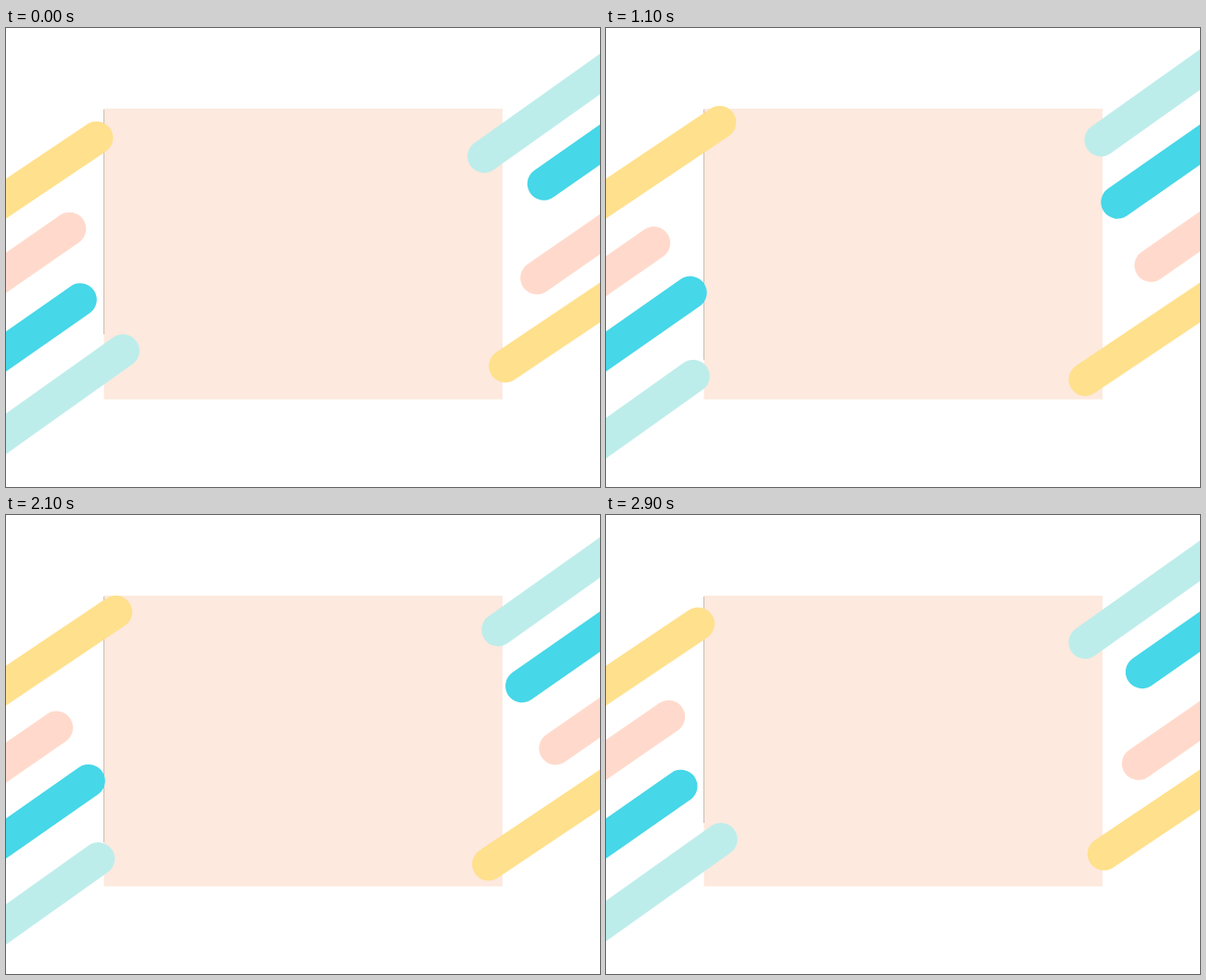
Write an HTML page with a canvas that moves like this. It is 640 by 495 pixels and loops after 3000 ms.

```html
<!DOCTYPE html>
<html lang="en">
<head>
<meta charset="utf-8">
<title>Sliding bars</title>
<style>
  html, body { margin: 0; width: 100%; height: 100%; overflow: hidden; background: #fff; }
  canvas { display: block; width: 640px; height: 495px; }
</style>
</head>
<body>
<canvas id="stage" width="640" height="495"></canvas>
<script>
const ctx = document.getElementById('stage').getContext('2d');
const WIDTH = 640, HEIGHT = 495;
const LOOP = 3000, STEP = 100, PEAK = 1520, RETURN = 2970;
const RADIUS = 17.8;
const PANEL = { left: 105.5, top: 87, right: 535, bottom: 400.5 };

// slope: tilt of the axis; drift: sideways shift while sliding.
const yellow = { color: '#ffe08c', slope: 0.672, drift: 0 };
const pink = { color: '#ffdacc', slope: 0.693, drift: 5 };
const cyan = { color: '#46d7e8', slope: 0.698, drift: 0 };
const mist = { color: '#bdedeb', slope: 0.711, drift: 6.5 };

// dir points from the stage side inwards; reach is the horizontal travel that way.
const bar = (style, dir, x, y, reach, peak = PEAK) => ({ ...style, dir, x, y, reach, peak });

const lowerMist = bar(mist, 1, 126, 348, -44.3);
const bars = [
  bar(yellow, 1, 97.5, 118.5, 34.5),
  bar(pink, 1, 68.5, 216.5, -23.5),
  bar(cyan, 1, 80, 293, 15),
  lowerMist,
  bar(mist, -1, 515, 138.5, -25.3),
  bar(cyan, -1, 579.5, 168, 39.3),
  bar(pink, -1, 572, 269.5, -25.6, 1860),
  bar(yellow, -1, 538, 364.5, 30)
];

// Linear out and back.
function travel(t, peak) {
  return t < peak ? t / peak : Math.max(0, (RETURN - t) / (RETURN - peak));
}

function tipAt(b, t) {
  const k = travel(t, b.peak) * b.dir;
  const dx = b.reach * k;
  return { x: b.x + dx, y: b.y - b.slope * dx + b.drift * k };
}

function drawBar(b, t) {
  const { x, y } = tipAt(b, t);
  const length = -b.dir * WIDTH;
  ctx.strokeStyle = b.color;
  ctx.beginPath();
  ctx.moveTo(x, y);
  ctx.lineTo(x + length, y - b.slope * length);
  ctx.stroke();
}

function drawPanel(t) {
  const { left, top, right, bottom } = PANEL;
  ctx.fillStyle = '#fde9de';
  ctx.fillRect(left, top, right - left, bottom - top);
  // The hairline ends at the lower bar while that bar overlaps the panel.
  const { x, y } = tipAt(lowerMist, t);
  const end = x + RADIUS > left ? y - RADIUS : bottom;
  ctx.fillStyle = '#c2bfbc';
  ctx.fillRect(105, top + 1, 1, end - top - 1);
}

function render(now) {
  const t = Math.floor((now % LOOP) / STEP) * STEP;
  ctx.fillStyle = '#fff';
  ctx.fillRect(0, 0, WIDTH, HEIGHT);
  drawPanel(t);
  ctx.lineWidth = RADIUS * 2;
  ctx.lineCap = 'round';
  bars.forEach(b => drawBar(b, t));
}

const start = performance.now();
function tick() {
  render(performance.now() - start);
  requestAnimationFrame(tick);
}
tick();
</script>
</body>
</html>
```
